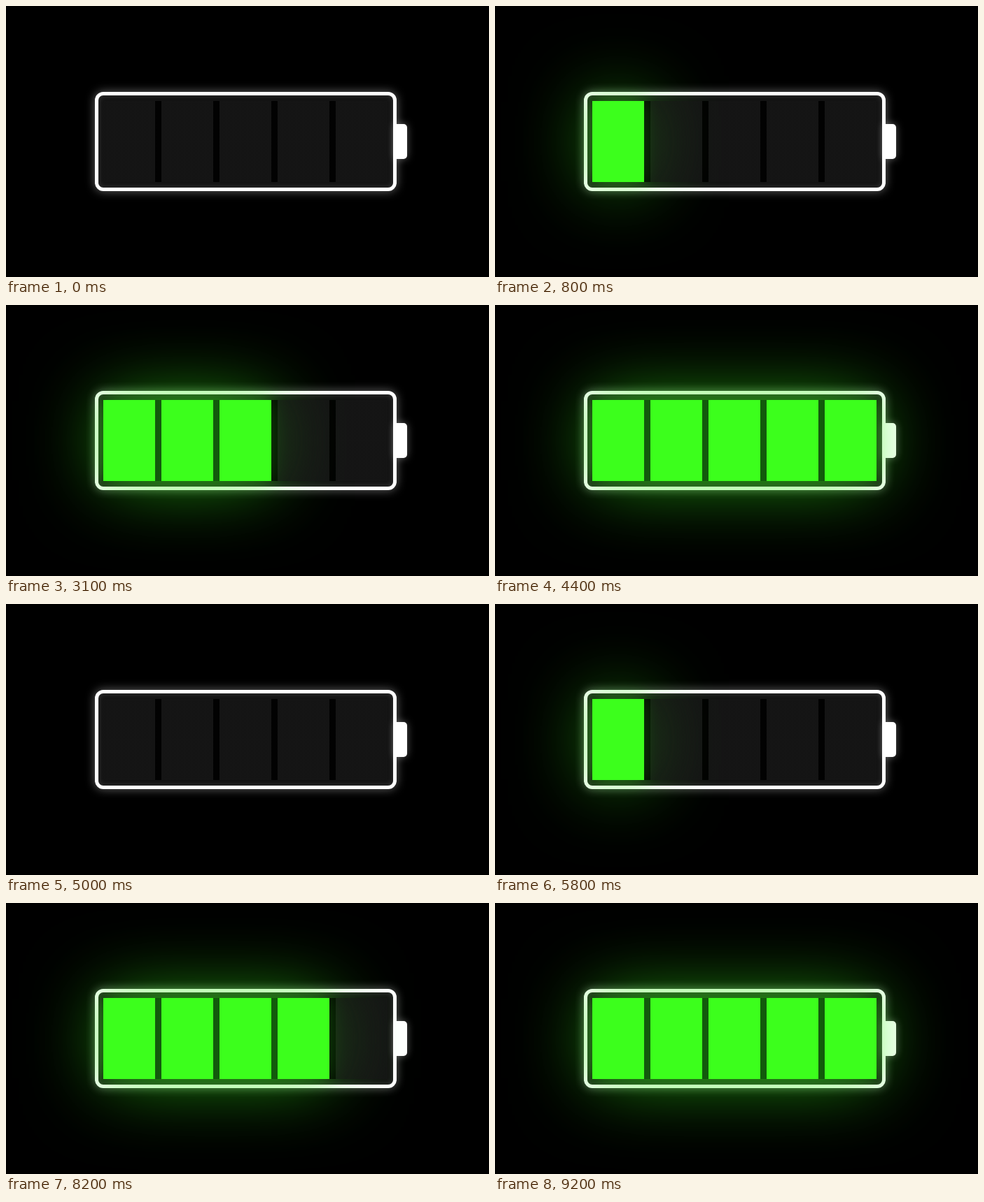
Recreate the animation shown at these times as an HTML page. Size 690x388 px, loop 10 s.

```html
<!DOCTYPE html>
<html lang="en">
<head>
<meta charset="utf-8">
<title>Charging battery</title>
<style>
  :root {
    --pitch: 82.9px;
    --cell: 74.4px;
    --neon: 57, 255, 26;
  }
  html, body {
    margin: 0;
    width: 100%;
    height: 100%;
    overflow: hidden;
    background: #000;
  }
  .stage {
    position: relative;
    width: 690px;
    height: 388px;
    overflow: hidden;
  }
  .stage div {
    position: absolute;
    box-sizing: border-box;
  }
  .cap {
    left: 555px;
    top: 169px;
    width: 18px;
    height: 50px;
    border-radius: 0 5px 5px 0;
    background: #fff;
    box-shadow: 0 0 12px rgba(255, 255, 255, .35);
  }
  .shell {
    left: 127.3px;
    top: 123.3px;
    width: 430.6px;
    height: 141.6px;
    border: 5.5px solid #fff;
    border-radius: 12px;
    background: #131313;
    box-shadow: 0 0 14px rgba(255, 255, 255, .4), inset 0 0 9px rgba(255, 255, 255, .14);
  }
  .row {
    left: 139px;
    top: 136px;
    width: 406px;
    height: 116px;
  }
  .empty {
    background: repeating-linear-gradient(90deg, #151515 0 var(--cell), #020202 var(--cell) var(--pitch));
  }
  .shade { opacity: .5; }
  .glow {
    box-shadow: 0 0 110px rgba(var(--neon), .6), 0 0 24px rgba(var(--neon), .35);
  }
  .lit {
    background: repeating-linear-gradient(90deg, #3cff1c 0 var(--cell), #125a0c var(--cell) var(--pitch));
  }
  .charge { animation: charge 10s step-end infinite; }

  @keyframes charge {
    0%, 50%  { width: 0; opacity: 0; }
    8%, 58%  { width: 74.4px; opacity: 1; }
    16%, 66% { width: 157.3px; opacity: 1; }
    24%, 74% { width: 240.2px; opacity: 1; }
    33%, 82% { width: 323.1px; opacity: 1; }
    40%, 90% { width: 406px; opacity: 1; }
    100%     { width: 406px; opacity: 1; }
  }
</style>
</head>
<body>
<div class="stage">
  <div class="shell"></div>
  <div class="cap"></div>
  <div class="row empty"></div>
  <div class="row glow charge"></div>
  <div class="row empty shade"></div>
  <div class="row lit charge"></div>
</div>
</body>
</html>
```
